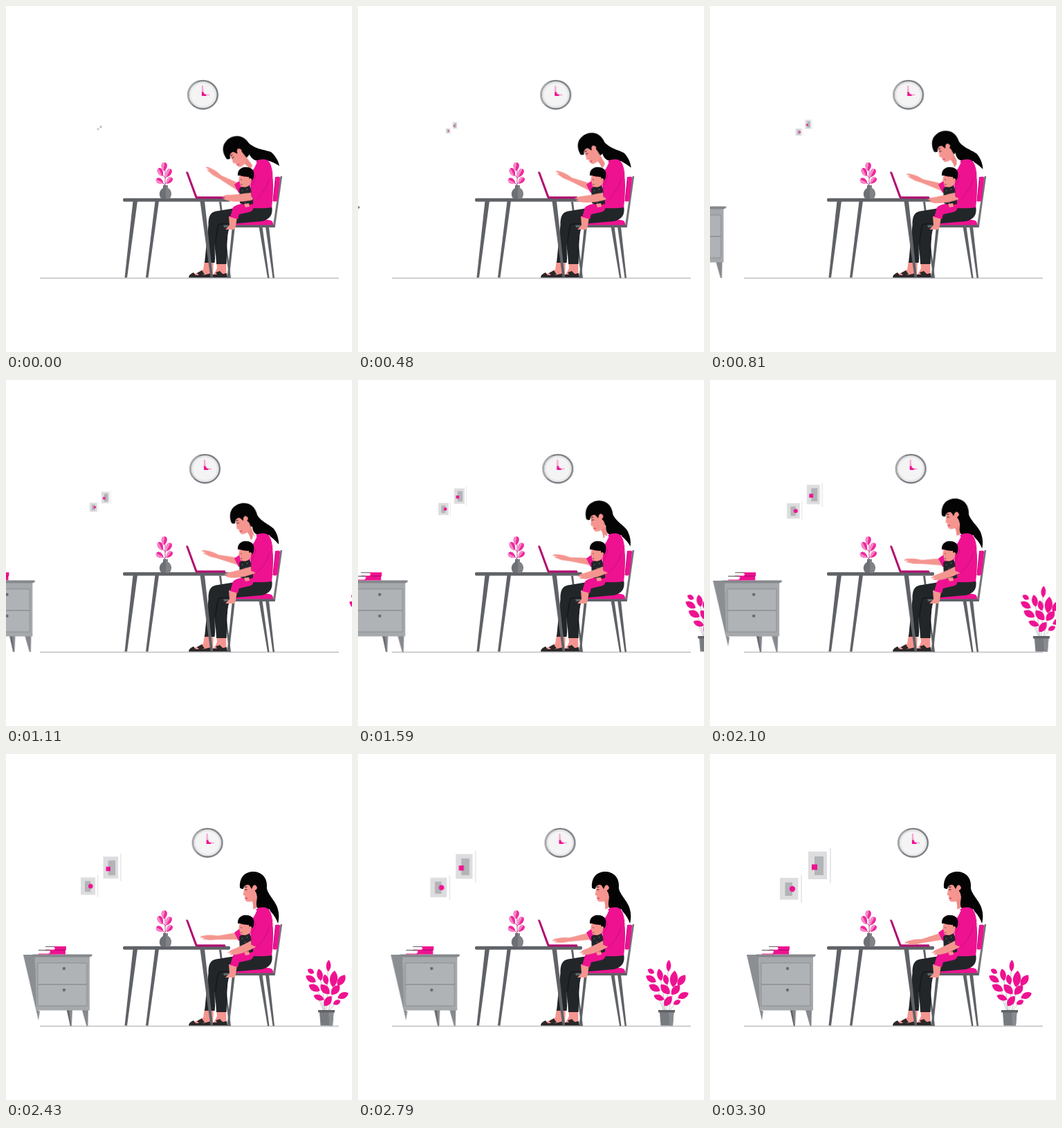
An HTML page for the animation above (3.63 s loop, 500 px wide and 500 px high).

```html
<!DOCTYPE html>
<html lang="en">
<head>
<meta charset="utf-8">
<title>Working from home</title>
<style>
html, body { margin: 0; width: 100%; height: 100%; overflow: hidden; background: #fff; }
svg { display: block; width: 100vw; height: 100vh; }

.pink { fill: #ee1291; }
.dark { fill: #222629; }
.black { fill: #040405; }
.skin { fill: #f5958f; }
.metal { fill: #5f6267; }

/* Motion runs in 30 ms ticks and rests at the end of each loop. */
.move { animation: 3630ms -1ms infinite; }
.clock { animation-name: clock; animation-timing-function: steps(110); }
.pictures { animation-name: pictures; animation-timing-function: steps(105); transform-origin: 135px 176px; }
.cabinet { animation-name: cabinet; animation-timing-function: steps(96); }
.plant { animation-name: plant; animation-timing-function: steps(102); }
.head { animation-name: head; animation-timing-function: steps(79); transform-origin: 376px 239px; }
.tail { animation-name: tail; animation-timing-function: steps(79); }
.far-arm { animation-name: far-arm; animation-timing-function: steps(102); transform-origin: 338px 263px; }
.near-arm { animation-name: near-arm; animation-timing-function: steps(79); transform-origin: 350.5px 256.5px; }

@keyframes clock { 0% { transform: translateX(-9px); } 90.909%, 100% { transform: none; } }
@keyframes pictures { 0% { transform: scale(.1); } 86.777%, 100% { transform: scale(1); } }
@keyframes cabinet { 0% { transform: translateX(-180px); } 79.339%, 100% { transform: translateX(0); } }
@keyframes plant { 0% { transform: translateX(146px); } 84.298%, 100% { transform: translateX(0); } }
@keyframes head { 0% { transform: rotate(-33deg); } 65.289%, 100% { transform: rotate(0deg); } }
@keyframes far-arm { 0% { transform: rotate(42deg); } 84.298%, 100% { transform: rotate(0deg); } }
@keyframes near-arm { 0% { transform: rotate(20deg); } 65.289%, 100% { transform: rotate(0deg); } }
@keyframes tail {
  0% { d: path("M338 209L346 193C358 208 373 207 383 211C390 217 394 225 395 231C386 226 379 222 371 223C360 226 354 220 351 213C349 208 345 211 338 209Z"); }
  65.289%, 100% { d: path("M355 190L376 186C375 200 386 208 391 219C395 228 395 238 393 245C389 234 382 224 372 222C365 226 361 223 362 214C363 208 364 204 360 198Z"); }
}
</style>
</head>
<body>
<svg viewBox="0 0 500 500" xmlns="http://www.w3.org/2000/svg">
  <defs>
    <path id="leaf" d="M0 9C-6 4-6-4 0-9C6-4 6 4 0 9Z"/>
    <path id="drop" d="M0 8C-6 3-6-7 0-7C6-7 6 3 0 8Z"/>
    <linearGradient id="petal"><stop offset=".5" stop-color="#f884c6"/><stop offset=".5" stop-color="#ee2a9d"/></linearGradient>
  </defs>

  <g class="move clock">
    <ellipse cx="293.5" cy="128.300" rx="21.200" ry="20.300" fill="#f0f0f1" stroke="#808388" stroke-width="2.600"/>
    <path d="M279 142A20 19 0 0 1 286 110" fill="none" stroke="#a9abae" stroke-width="2"/>
    <ellipse cx="293.5" cy="128.300" rx="18" ry="17.200" fill="#f4f4f5" stroke="#dedfe1"/>
    <path d="M291.5 129L292 115H293.800L294.800 129Z" fill="#f9a3d2"/>
    <path d="M292 124.500L294 124L296 127.500L300 128L298 130H292Z" class="pink"/>
    <path d="M298 127.800H303V129.200H298Z" fill="#f79acb"/>
  </g>

  <g class="move pictures">
    <path d="M142 141H169V181H142Z" fill="#dddddf"/>
    <path d="M151 148H164V175H151Z" fill="#b2b4b7"/>
    <path d="M147 159.5H155V167.5H147Z" class="pink"/>
    <path d="M173.3 136H174.6V186H173.3Z" fill="#dcdcde"/>
    <path d="M101 179H127.500V210.500H101Z" fill="#dddddf"/>
    <path d="M108.500 185.500H119V205H108.500Z" fill="#b2b4b7"/>
    <circle cx="119" cy="195" r="4.200" class="pink"/>
    <path d="M131.500 175H132.700V215H131.500Z" fill="#dcdcde"/>
  </g>

  <path d="M49 393.300H481" stroke="#c6c7c9" stroke-width="1.700"/>

  <g class="move cabinet">
    <path d="M53 290H70L74 370L77 372L75 385Z" fill="#8b8e92"/>
    <path d="M116 370H124L123 393H121Z M138 370H147L146.500 393H144.500Z" fill="#85888c"/>
    <path d="M116 370H119L122 393H121Z" fill="#5f6267"/>
    <path d="M70 292H149V370.500H72Z" fill="#a6a9ac"/>
    <path d="M66 289.500H152.500V292L149 293.500H69Z" fill="#85888c"/>
    <path d="M74 302H145V333H74Z M74 333H145V364H74Z" fill="#b0b3b6" stroke="#8b8e92"/>
    <circle cx="112" cy="310" r="2.200" fill="#686b70"/>
    <circle cx="112" cy="341" r="2.200" fill="#686b70"/>
    <path d="M86 278.500H100V283H86Z M76 284H92V289H76Z" fill="#fff"/>
    <path d="M98 283.300H85M92 289H75" stroke="#ee1291" stroke-width="1.200"/>
    <path d="M85 278.300H98M75 283.500H92" stroke="#24272a" stroke-width=".8"/>
    <path d="M97 278H115V283.500H97L99 281Z M91 283H114V289.500H90L92 286Z" class="pink"/>
    <path d="M99 283.300H114" stroke="#8f0a58" stroke-width=".8"/>
  </g>

  <g class="move plant">
    <path d="M433 371Q435 340 435 314M431 371Q428 340 424 325M430 371Q424 345 413 329M436 371Q441 350 446 333M437 371Q446 361 452 352M429 371L422 354" fill="none" stroke="#b8bbbd" stroke-width=".9"/>
    <g class="pink">
      <use href="#leaf" transform="translate(436 306)rotate(3)scale(.75 .95)"/>
      <use href="#leaf" transform="translate(423.500 319)rotate(-10)scale(.95 1)"/>
      <use href="#leaf" transform="translate(410.500 314)rotate(-58)scale(.75 .6)"/>
      <use href="#leaf" transform="translate(410.500 325)rotate(-58)scale(1 .95)"/>
      <use href="#leaf" transform="translate(415.500 338)rotate(-62)scale(1.100 1)"/>
      <use href="#leaf" transform="translate(432 326)rotate(-12)scale(.9 .85)"/>
      <use href="#leaf" transform="translate(443.500 325)rotate(6)scale(1.250 1.350)"/>
      <use href="#leaf" transform="translate(454.500 327)rotate(35)scale(1.100 1.050)"/>
      <use href="#leaf" transform="translate(431 340)rotate(-42)scale(1.200 1.050)"/>
      <use href="#leaf" transform="translate(446 341)rotate(42)scale(1.150 1)"/>
      <use href="#leaf" transform="translate(457 349)rotate(65)scale(1 .95)"/>
      <use href="#leaf" transform="translate(448 359)rotate(65)scale(.75 .65)"/>
      <use href="#leaf" transform="translate(422 352)rotate(-68)scale(.9 .9)"/>
      <use href="#leaf" transform="translate(435 357)rotate(35)scale(1.100 1)"/>
    </g>
    <path d="M423 373H443.500L442 392.500H424.500Z" fill="#777a7f"/>
    <path d="M436 373H443.500L442 392.500H437Z" fill="#888b90"/>
    <path d="M421 370H445V373.500H421Z" class="metal"/>
  </g>

  <!-- Chair -->
  <path d="M396.500 246H399.200L388.800 320H385.500Z" fill="#73767b"/>
  <path d="M389.500 247Q397 245 396 250L392.500 281Q389.500 284 386 282Z" class="pink"/>
  <path d="M389.500 247L386 282" stroke="#b00c70"/>
  <path d="M365.500 319H370.500L380.500 393H378Z M375 319H380L388 393H385.500Z" class="metal"/>
  <path d="M308 283H311L325 393H322.500Z" class="metal"/>

  <!-- Legs and feet -->
  <path d="M287 368H300L299 389H268Q278 385 285 381Z M304 368H318L318.500 389H299Q303 384 305 379Z" class="skin"/>
  <path d="M264 392.500C264 388 269 386 271 385L274 389H285L297 386V392.500Z M276 386L283 382L287 388L280 390Z M297 392.500L299 388H310L319 386L320 392.500Z M303 385L309 383L314 388L306 390Z" fill="#2b2729"/>
  <path d="M321 309H378Q386 309 386 315V318H318Z" class="pink"/>
  <path d="M350 289H384C386 300 383 308 370 311L326 315C319 322 319 334 318 373H304L302 342L301 371H287L292.500 316C292.500 301 297 297 307 296Z" class="dark"/>
  <path d="M326 315L308 315C303 325 303 345 301 371M326 315C319 322 319 335 318 373" fill="none" stroke="#0e1011" stroke-width="1"/>

  <!-- Head and torso -->
  <g class="move head">
    <path d="M352 206L363 202L364 221L357 225Q358 219 356 213Z" fill="#ee8a87"/>
    <path d="M347 186H364V205C361 211 357 213.500 351 213.500C346.500 213.500 345.500 211.500 346 209L344.500 207L345.500 205L342.500 203.500C344 199 344 195 345 190Z" class="skin"/>
    <path d="M345.500 209L349 208.300" stroke="#c9245c" stroke-width="1"/>
    <path d="M345 196H348.500M344.700 192.500L348.500 192" stroke="#2b1a1c" stroke-width="1"/>
  </g>
  <path class="move tail black" d="M355 190L376 186C375 200 386 208 391 219C395 228 395 238 393 245C389 234 382 224 372 222C365 226 361 223 362 214C363 208 364 204 360 198Z"/>
  <g class="move head">
    <path d="M338 193C337 179 345 170 357 170C369 170 377 178 377 190C377 199 372 206 363 207L362 197C362 190 357 189 355 195C353 192 352 189 350 189C347 189 344 190 343 195Q339 195 338 193Z" class="black"/>
    <path d="M356 192Q359 187 362 191T358 198Z" class="skin"/>
  </g>
  <path d="M362 224C369 220 378 221 382 227C387 238 387 270 384 291Q368 294 340 290L354 270C353 255 352 244 358 234Z" class="pink"/>
  <path d="M357 224L358 234L362 226" fill="none" stroke="#fff" stroke-width="1.500"/>
  <path d="M380 224Q387 235 386 250" fill="none" stroke="#fbd8ea" stroke-width="1"/>

  <!-- Table -->
  <path d="M183.500 282H190L175 392.500H171.500Z M215.500 282H221L205.500 392.500H202Z M280.500 282H287L299 392.500H295.500Z" class="metal"/>
  <rect x="169" y="277.700" width="155" height="5" rx="2" class="metal"/>
  <path d="M327 318H331L322.500 393H319.500Z" class="metal"/>
  <path d="M314 316.500H389L388 320H315Z" class="metal"/>

  <!-- Vase -->
  <path d="M230 262V235M230 259L223 252M230 257L236 250M230 248L224 241M230 249L235 242" stroke="#b5267b" stroke-width=".8"/>
  <g fill="url(#petal)">
    <use href="#drop" transform="translate(228.500 232)rotate(5)scale(.95 .85)"/>
    <use href="#drop" transform="translate(223 240)rotate(-25)scale(.9)"/>
    <use href="#drop" transform="translate(235 241)rotate(25)scale(.9)"/>
    <use href="#drop" transform="translate(222 253)rotate(-60)scale(.9 .8)"/>
    <use href="#drop" transform="translate(236 252)rotate(42)scale(.85 .8)"/>
  </g>
  <path d="M227 259H234V263C240 266 240 275 236 278.500H225C220 275 221 266 227 263Z" fill="#6d7075"/>
  <path d="M231 259H234V263C240 266 240 275 236 278.500H231Z" fill="#7f8287"/>

  <!-- Laptop -->
  <path d="M260 240Q262 238 263.300 241L276.500 277H273.500Z" fill="#a80f6c"/>
  <path d="M262.800 240.500L276 276" stroke="#d81388" stroke-width=".9"/>
  <path d="M274 275.300H316Q318 276 317 278.500H274Z" fill="#b01072"/>

  <path class="move far-arm skin" d="M338 257L306 267.500C298 267 290 268.500 283 271.500L281 274L288 273L284 275.500H296L307 273L339 268Z"/>
  <path d="M356 236L345 247L330 258L336 270L352 266Z" class="pink"/>

  <!-- Baby -->
  <path d="M322 304L334 305L332 318L330 323H317L323 317Z" class="skin"/>
  <path d="M324 305L328 291C336 284 348 286 357 285Q360 296 351 298L337 301L335 308Z" class="pink"/>
  <path d="M337 264Q344 258 352 260L357 270V286Q346 289 338 285Z" class="dark"/>
  <path d="M341 267h1M348 265h1M345 272h1M352 271h1M341 278h1M349 279h1M354 277h1M345 284h1" stroke="#a3a7aa" stroke-width="1"/>
  <path d="M338 243H354V255C352 261 346 263 340 261Q337 259 338 255L336 253Z" class="skin"/>
  <path d="M335 245C334 237 341 232 348 233C356 233 360 240 358 246C358 251 355 253 352 252L351 247C347 247 341 246 338 245Z" class="black"/>
  <path d="M339 251h2M338.500 258h3" stroke="#8c3038" stroke-width=".9"/>
  <circle cx="353" cy="251" r="2" class="skin"/>

  <!-- Near arm -->
  <path class="move near-arm skin" d="M362 266C346 274 334 280 325 283.500L320 288L326 287L323 290H332C344 288 354 283 364 277Z"/>
  <path d="M344 286L351 285L352 290L346 291Z" class="skin"/>
  <path d="M368 224C360 231 361 247 354 263L355 276L362 279C371 271 379 259 382 246C384 230 378 221 368 224Z" class="pink"/>
  <path d="M362 279C371 271 378 260 381 248M361 244Q359 254 354 263L355 276" fill="none" stroke="#bd0d75" stroke-width=".8"/>
</svg>
</body>
</html>
```
